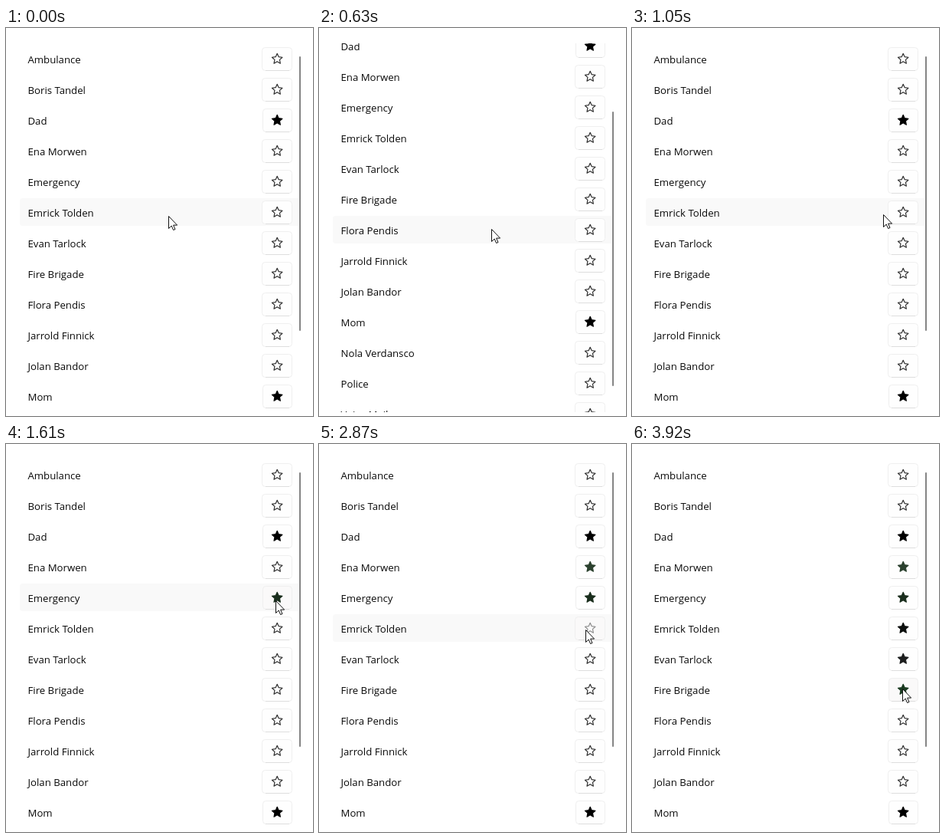
An HTML page for the animation above (4.55 s loop, 401 px wide and 506 px high).

```html
<!DOCTYPE html>
<html lang="en">
<head>
<meta charset="utf-8">
<title>Contact favourites</title>
<style>
html, body { margin: 0; width: 100%; height: 100%; overflow: hidden; background: #fff; }
svg { display: block; }
text { font: 13.2px "Open Sans", "Noto Sans", sans-serif; fill: #0a0a0a; }
</style>
</head>
<body>
<svg id="stage" width="401" height="506" viewBox="0 0 401 506">
  <defs><clipPath id="view"><rect x="0" y="20" width="401" height="481"/></clipPath></defs>
  <g clip-path="url(#view)"><g id="list"></g></g>
  <rect id="thumb" x="383" y="37" width="2" height="358" rx="1" fill="#858585"/>
  <path id="cursor" d="M.5 .5V16.5L4.2 13L6.6 18.5L9 17.5L6.6 12.1H11.6Z" fill="#fff" stroke="#111" stroke-linejoin="round"/>
</svg>
<script>
const LOOP = 4550, STEP = 70, PITCH = 40;

// filledAt: time at which the star becomes solid
const contacts = [
  { name: "Ambulance" },
  { name: "Boris Tandel" },
  { name: "Dad", filledAt: 0 },
  { name: "Ena Morwen", filledAt: 1960, color: "#2b412e" },
  { name: "Emergency", filledAt: 1540, color: "#1a2e1d" },
  { name: "Emrick Tolden", filledAt: 2940, color: "#0c0f0d" },
  { name: "Evan Tarlock", filledAt: 3290, color: "#1c1e1e" },
  { name: "Fire Brigade", filledAt: 3850, color: "#1a3a20" },
  { name: "Flora Pendis" },
  { name: "Jarrold Finnick" },
  { name: "Jolan Bandor" },
  { name: "Mom", filledAt: 0 },
  { name: "Nola Verdansco" },
  { name: "Police" },
  { name: "Voice Mail" }
];

// [time, scroll offset]
const scrollKeys = [
  [0, 0], [70, 8], [140, 28], [210, 52], [280, 75], [350, 93], [420, 105], [490, 113],
  [560, 112], [630, 97], [700, 72], [770, 45], [840, 23], [910, 9], [980, 2], [1050, 0]
];

// [time, x, y] of the pointer tip
const pointerKeys = [
  [0, 212, 245], [70, 212, 245], [350, 225, 262], [700, 225, 262], [1050, 328, 243],
  [1120, 336, 235], [1400, 352, 204], [1680, 352, 204], [1820, 354, 166], [2030, 354, 166],
  [2240, 358, 253], [2380, 363, 291], [2520, 363, 291], [2800, 348, 242], [2940, 348, 242],
  [3010, 355, 267], [3150, 350, 280], [3220, 350, 280], [3430, 342, 318], [3500, 342, 318],
  [3710, 353, 319]
];

function sample(keys, time) {
  const next = keys.findIndex(key => key[0] > time);
  if (next < 0) return keys[keys.length - 1].slice(1);
  const a = keys[next - 1], b = keys[next];
  const u = (time - a[0]) / (b[0] - a[0]);
  return a.slice(1).map((v, i) => v + (b[i + 1] - v) * u);
}

function make(tag, attrs, parent) {
  const node = document.createElementNS("http://www.w3.org/2000/svg", tag);
  set(node, attrs);
  parent.appendChild(node);
  return node;
}

function set(node, attrs) {
  for (const key in attrs) node.setAttribute(key, attrs[key]);
}

function starPath(cx, cy, radius) {
  const points = Array.from({ length: 10 }, (_, i) => {
    const r = i % 2 ? radius * 0.48 : radius;
    const angle = i * Math.PI / 5 - Math.PI / 2;
    return (cx + r * Math.cos(angle)).toFixed(2) + " " + (cy + r * Math.sin(angle)).toFixed(2);
  });
  return "M" + points.join("L") + "Z";
}

const list = document.getElementById("list");
const thumb = document.getElementById("thumb");
const cursor = document.getElementById("cursor");
const highlight = make("rect", { x: 18, width: 366, height: 36, rx: 4, fill: "#f9f9f9" }, list);

const rows = contacts.map((contact, i) => {
  const g = make("g", { transform: `translate(0 ${PITCH * (i + 1)})` }, list);
  make("text", { x: 28.5, y: 6 }, g).textContent = contact.name;
  const button = make("rect", { y: -14.5, height: 30, rx: 4, stroke: "#efefef" }, g);
  make("path", { d: "M339 15.5H370", stroke: "#dedede" }, g);
  const star = make("path", {
    d: starPath(354.2, 0.4, 7.1), "stroke-width": 1.15, "stroke-linejoin": "round"
  }, g);
  return { ...contact, button, star };
});

function render(time) {
  const [scroll] = sample(scrollKeys, time).map(Math.round);
  const [x, y] = sample(pointerKeys, time).map(Math.round);
  const hovered = Math.floor((y + scroll - 20) / PITCH);

  set(list, { transform: `translate(0 ${-scroll})` });
  set(thumb, { y: 37 + Math.round(scroll * 0.745) });
  set(cursor, { transform: `translate(${x} ${y})` });
  set(highlight, { y: 22 + hovered * PITCH, visibility: time < 3850 ? "visible" : "hidden" });

  rows.forEach(({ filledAt, color = "#000", button, star }, i) => {
    const filled = time >= filledAt;
    const pressed = !filled && time >= filledAt - 140;
    const hover = i === hovered && x >= 335 && x <= 373;
    const left = filled ? 335.5 : 334.5;
    set(button, { x: left, width: 373.5 - left, fill: hover ? "#faf9f9" : "#fefefe" });
    set(star, {
      fill: filled ? color : "none",
      stroke: filled ? color : pressed ? "#8c8c8c" : "#2b2b2b"
    });
  });
}

const start = performance.now();
function tick() {
  const elapsed = (performance.now() - start) % LOOP;
  render(Math.floor(elapsed / STEP) * STEP);
  requestAnimationFrame(tick);
}
tick();
</script>
</body>
</html>
```
